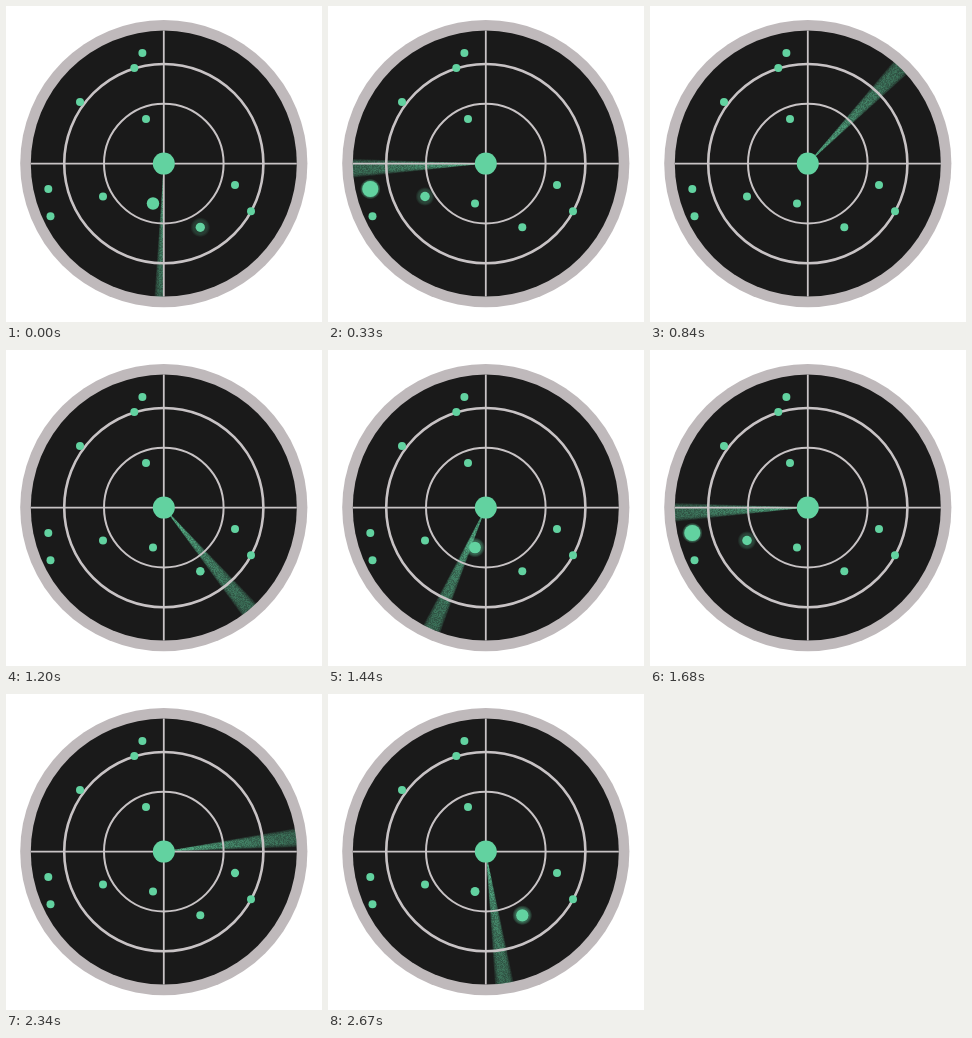
Recreate the animation shown at these times as an HTML page with a canvas. Size 316x316 px, loop 2700 ms.

```html
<!DOCTYPE html>
<html lang="en">
<head>
<meta charset="utf-8">
<title>Radar</title>
<style>
html, body { margin: 0; width: 100%; height: 100%; overflow: hidden; background: #fff; }
canvas { display: block; width: 316px; height: 316px; }
</style>
</head>
<body>
<canvas id="radar"></canvas>
<script>
const SIZE = 316, CX = 157.8, CY = 157.6, FACE = 133;
const TURN = 1350, STEP = 30;
const GREEN = '#62d2a0', GREY = '#c8c3c5';
const TAU = Math.PI * 2, DEG = Math.PI / 180;
const GROW = 100, FADE = 90;

// x, y, time of the widest pulse, widest radius
const blips = [
  [147, 197.5, 50, 8.5], [44.5, 210.3, 220, 8.5], [97, 190.5, 270, 8],
  [42.3, 183, 320, 8.8], [74, 96, 490, 8.5], [128.3, 62, 640, 9],
  [140, 113, 705, 8.5], [136.4, 47, 740, 8.5], [229, 179, 1080, 8.5],
  [245, 205.3, 1105, 8.5], [194.3, 221.3, 1285, 8.5]
];

const ratio = window.devicePixelRatio || 1;

function layer(canvas = document.createElement('canvas')) {
  canvas.width = canvas.height = SIZE * ratio;
  const c = canvas.getContext('2d');
  c.scale(ratio, ratio);
  return c;
}

const ctx = layer(document.getElementById('radar'));
const beam = layer();
const grain = layer();

function disc(c, x, y, r, fill) {
  c.fillStyle = fill;
  c.beginPath();
  c.arc(x, y, r, 0, TAU);
  c.fill();
}

function ring(c, r, width) {
  c.lineWidth = width;
  c.beginPath();
  c.arc(CX, CY, r, 0, TAU);
  c.stroke();
}

function makeGrain() {
  let seed = 71;
  const random = () => (seed = seed * 16807 % 2147483647) / 2147483647;
  for (let y = 0; y < SIZE; y++) {
    for (let x = 0; x < SIZE; x++) {
      grain.fillStyle = `rgba(0,0,0,${random() * 0.4})`;
      grain.fillRect(x, y, 1, 1);
    }
  }
}

// Angles run clockwise from straight down.
function drawBeam(angle) {
  beam.clearRect(0, 0, SIZE, SIZE);
  const shade = beam.createRadialGradient(CX, CY, 8, CX, CY, FACE);
  shade.addColorStop(0, 'rgba(98,210,160,.42)');
  shade.addColorStop(0.45, 'rgba(98,210,160,.22)');
  shade.addColorStop(1, 'rgba(98,210,160,.145)');
  beam.fillStyle = shade;
  for (const half of [4, 3.6, 3.1, 2.4]) {
    const from = Math.max(angle - half, 0);
    beam.beginPath();
    beam.moveTo(CX, CY);
    beam.arc(CX, CY, FACE, (from + 90) * DEG, (angle + half + 90) * DEG);
    beam.fill();
  }
  beam.globalCompositeOperation = 'destination-out';
  beam.drawImage(grain.canvas, 0, 0, SIZE, SIZE);
  beam.globalCompositeOperation = 'source-over';
  ctx.drawImage(beam.canvas, 0, 0, SIZE, SIZE);
}

function drawBlip([x, y, peak, widest], time) {
  const since = (time - peak + TURN * 1.5) % TURN - TURN / 2;
  let radius = 4;
  if (since > -GROW && since <= 0) {
    const p = 1 + since / GROW;
    radius += (widest - 4) * p * p * (3 - 2 * p);
  } else if (since > 0 && since < FADE) {
    const p = since / FADE;
    radius += (widest - 4) * (1 - p) ** 1.5;
    const outer = widest + 1.5;
    const halo = ctx.createRadialGradient(x, y, 2, x, y, outer);
    halo.addColorStop(0, `rgba(98,210,160,${0.8 * (1 - p)})`);
    halo.addColorStop(0.65, `rgba(98,210,160,${0.65 * (1 - p)})`);
    halo.addColorStop(1, 'rgba(98,210,160,0)');
    disc(ctx, x, y, outer, halo);
  }
  disc(ctx, x, y, radius, GREEN);
}

function drawDial() {
  ctx.fillStyle = '#fff';
  ctx.fillRect(0, 0, SIZE, SIZE);
  disc(ctx, CX, CY, 143.6, '#bfb9bb');
  disc(ctx, CX, CY, FACE, '#1a1a1a');
}

function drawLines() {
  ctx.strokeStyle = GREY;
  ring(ctx, 99.6, 2.6);
  ring(ctx, 59.8, 2);
  ctx.lineWidth = 1.8;
  ctx.beginPath();
  ctx.moveTo(CX - FACE, CY);
  ctx.lineTo(CX + FACE, CY);
  ctx.moveTo(CX, CY - FACE);
  ctx.lineTo(CX, CY + FACE);
  ctx.stroke();
}

function frame() {
  const time = Math.floor(performance.now() / STEP) * STEP % TURN;
  drawDial();
  drawBeam(time / TURN * 360);
  drawLines();
  blips.forEach(blip => drawBlip(blip, time));
  disc(ctx, CX, CY, 11, GREEN);
  requestAnimationFrame(frame);
}

makeGrain();
frame();
</script>
</body>
</html>
```
